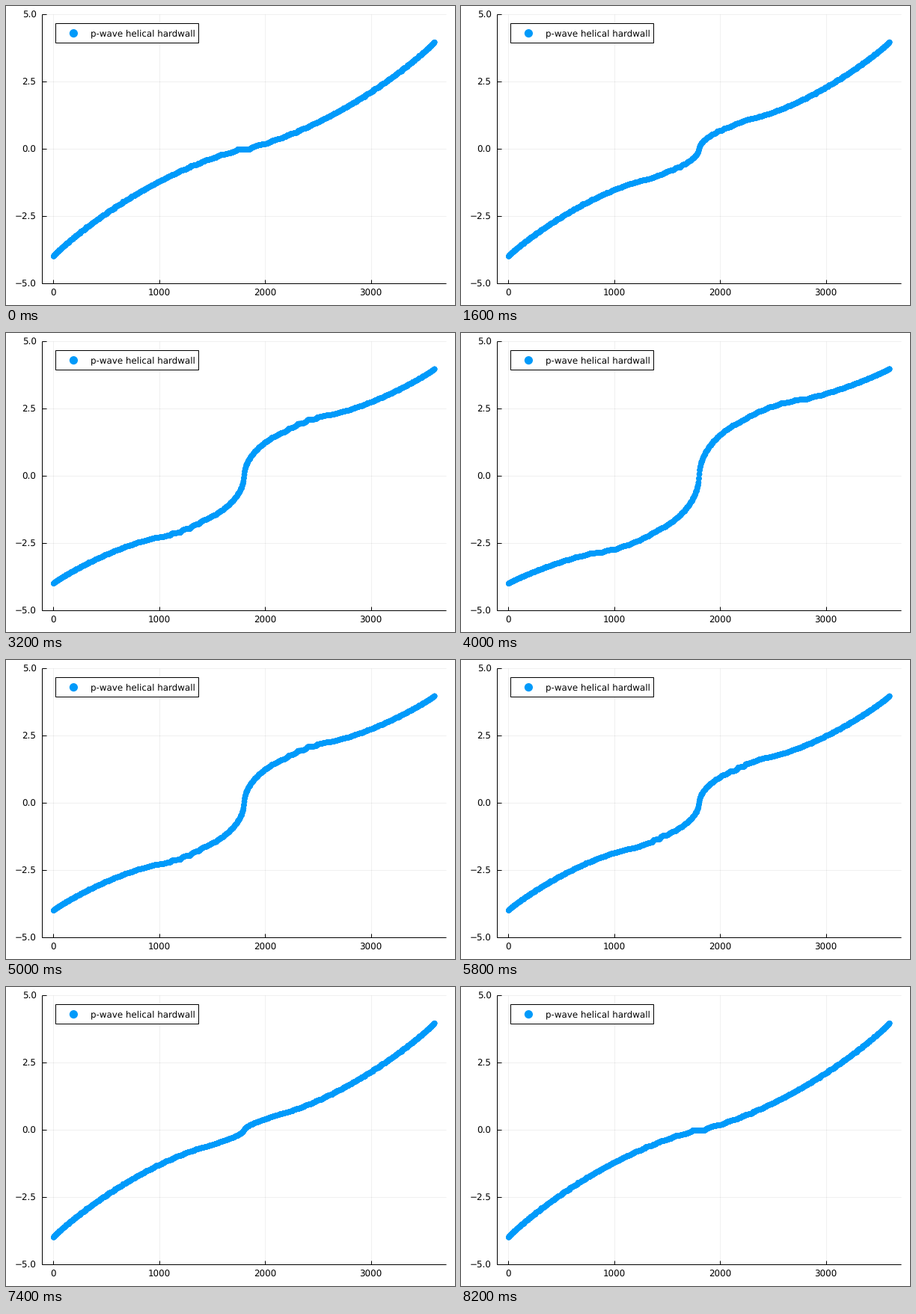
Recreate the animation shown at these times as a matplotlib script. Size 600 px wide and 400 px high, loop 8.4 s.

```python
import numpy as np
import matplotlib.pyplot as plt
from matplotlib.animation import FuncAnimation
from matplotlib.patches import Rectangle

plt.rcParams.update({"font.family": "DejaVu Sans", "text.hinting": "none"})

W, H, DPI = 600, 400, 100
PT = 72 / DPI                      # points per pixel
LEFT, RIGHT, TOP, BOTTOM = 48.3, 588.2, 11.8, 371.7
BLUE = "#009AFA"
FONT = 8.6
SIDE = 30                          # lattice sites per edge
STEPS = 21                         # pairing strengths 0.0, 0.1 ... 2.0
LEVELS = 4 * SIDE**2


# Helical p-wave superconductor on an open square lattice, zero chemical potential.
def lattice_blocks():
    """Hopping and pairing matrices reduced by inversion symmetry."""
    eye = np.eye(SIDE)
    shift = np.eye(SIDE, k=1)
    cos, sin = (shift + shift.T) / 2, (shift - shift.T) / 2j
    hop = -2 * (np.kron(cos, eye) + np.kron(eye, cos))
    pair = np.kron(sin, eye) - 1j * np.kron(eye, sin)
    half = SIDE**2 // 2

    def fold(m, sign):
        return m[:half, :half] + sign * m[:half, half:][:, ::-1]

    x, y = np.divmod(np.arange(half), SIDE)
    even = np.tile((x + y) % 2 == 0, 2)
    return fold(hop, 1), fold(hop, -1), fold(pair, -1), even


def spectrum(delta, blocks):
    """All sorted energies; each chiral pair is fourfold degenerate."""
    hop_p, hop_m, pair, even = blocks
    ham = np.block([[hop_p, delta * pair],
                    [delta * pair.conj().T, -hop_m]])
    s = np.linalg.svd(ham[even][:, ~even], compute_uv=False)
    return np.sort(np.repeat(np.concatenate([-s, s]), 4))


def px(i):
    pad = 0.03 * (LEVELS - 1)
    lo, hi = 1 - pad, LEVELS + pad
    return LEFT + (i - lo) / (hi - lo) * (RIGHT - LEFT)


def py(e):
    return BOTTOM - (e + 5) / 10 * (BOTTOM - TOP)


blocks = lattice_blocks()
index_px = px(np.arange(1, LEVELS + 1))
curves = [np.column_stack([index_px, py(spectrum(0.1 * n, blocks))])
          for n in range(STEPS)]

fig = plt.figure(figsize=(W / DPI, H / DPI), dpi=DPI, facecolor="white")
ax = fig.add_axes([0, 0, 1, 1])
ax.set(xlim=(0, W), ylim=(H, 0))
ax.axis("off")


def line(xs, ys, alpha=1, z=3):
    ax.plot(xs, ys, color="black", alpha=alpha, lw=PT, zorder=z,
            solid_capstyle="butt")


def label(x, y, text, ha):
    ax.text(x, y, text, ha=ha, va="baseline", fontsize=FONT, zorder=6)


top, bottom = int(TOP), int(BOTTOM)    # whole pixel rows keep lines crisp

for i in range(0, 4000, 1000):
    x = px(i)
    line([x, x], [top, bottom], alpha=0.06, z=1)
    line([x, x], [bottom, bottom - 5])
    label(x - 0.3, 387.4, str(i), "center")

for e in (-5, -2.5, 0, 2.5, 5):
    y = int(py(e))
    line([LEFT, RIGHT], [y, y], alpha=0.06, z=1)
    line([LEFT, LEFT + 5.5], [y, y])
    label(40.5, y + 5.2, f"{e:.1f}".replace("-", "\u2212"), "right")

line([LEFT, LEFT], [top, bottom])
line([LEFT, RIGHT], [bottom, bottom])

dots = ax.scatter(*curves[0].T, s=(7.2 * PT) ** 2, c=BLUE,
                  edgecolors="none", zorder=4)

ax.add_patch(Rectangle((66, 23), 191, 26, fc="white", ec="black",
                       lw=PT, zorder=5))
ax.scatter([90.4], [36.6], s=(11.2 * PT) ** 2, c=BLUE, edgecolors="none",
           zorder=6)
label(113, 40.4, "p-wave helical hardwall", "left")


def update(frame):
    dots.set_offsets(curves[min(frame, 2 * STEPS - 1 - frame)])
    return (dots,)


anim = FuncAnimation(fig, update, frames=2 * STEPS, interval=200,
                     repeat=True, repeat_delay=0, blit=False)
plt.show()
```
